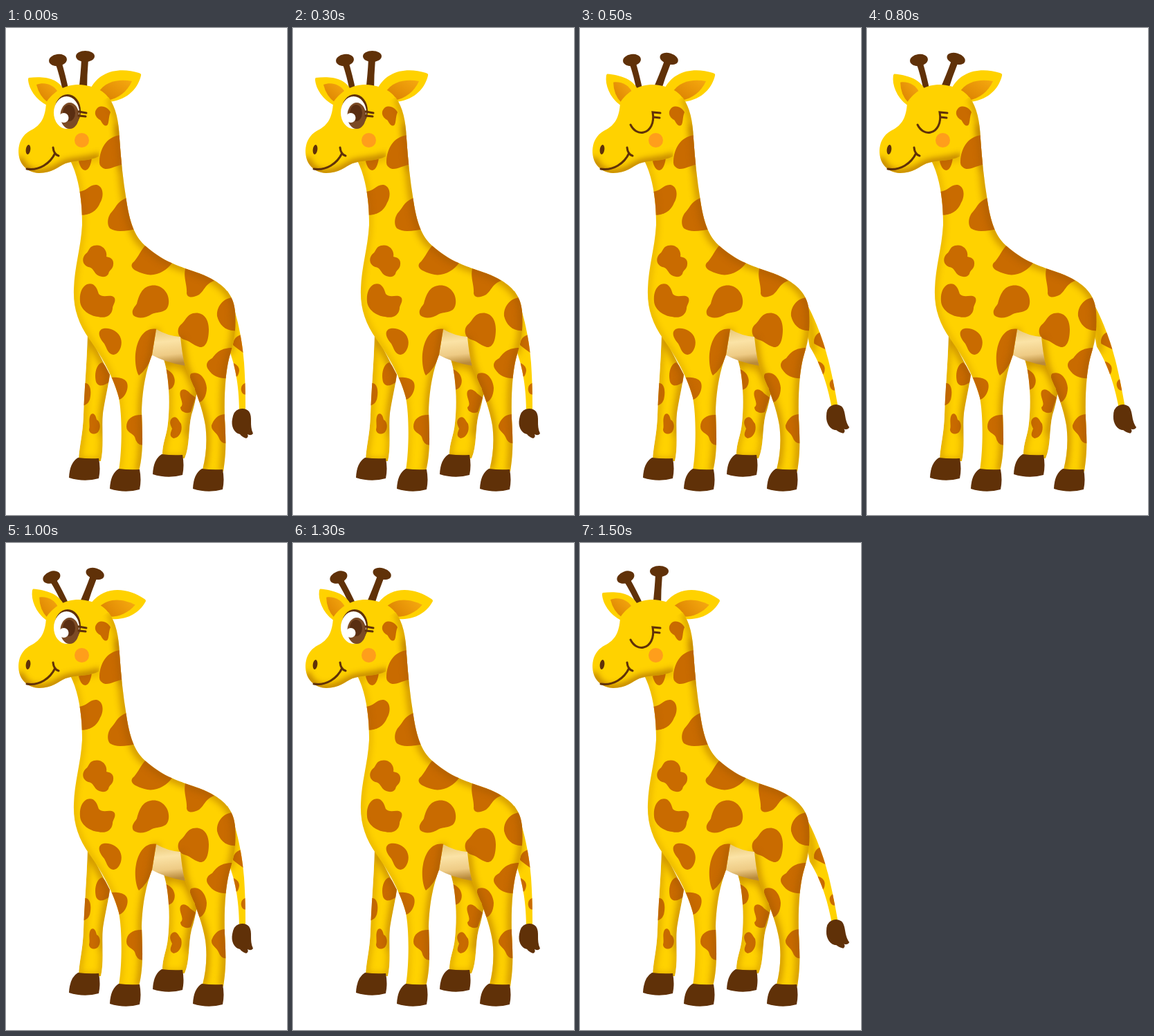
Animation, 406 px wide and 705 px high, one loop 2000 ms. Source, as an HTML page:

```html
<!DOCTYPE html>
<html lang="en">
<head>
<meta charset="utf-8">
<title>Giraffe</title>
<style>
  html, body { margin: 0; width: 100%; height: 100%; overflow: hidden; background: #fff; }
  svg { display: block; }
  .skin { fill: #ffd200; }
  .spot { fill: #c96b00; }
  .dark { fill: #603108; }
  .line { fill: none; stroke: #603108; stroke-width: 3; stroke-linecap: round; }
  .shade { fill: none; stroke: #9c5600; filter: url(#soft); }
</style>
</head>
<body>
<svg width="406" height="705" viewBox="0 0 406 705">
  <defs>
    <filter id="soft" filterUnits="userSpaceOnUse" x="0" y="0" width="406" height="705">
      <feGaussianBlur stdDeviation="5"/>
    </filter>
    <linearGradient id="cream" x2="0.1" y2="1">
      <stop stop-color="#e6c36c"/><stop offset=".4" stop-color="#fbe3a6"/>
      <stop offset=".75" stop-color="#eecb85"/><stop offset="1" stop-color="#b98a3a"/>
    </linearGradient>
    <linearGradient id="inner" x1="0" y1="1" x2="1" y2="0">
      <stop stop-color="#d87d00"/><stop offset="1" stop-color="#f6a90f"/>
    </linearGradient>

    <path id="body" d="M148 100C159 115 163 135 164 160C166 190 169 220 174 250C179 284 187 303 202 316C214 326 225 334 239 340C255 348 286 355 302 366C319 377 329 389 331 410C333 440 329 455 324 472C317 495 315 530 316 565C318 600 318 615 314 642L284 639C289 620 291 598 288 575C284 550 272 520 263 500C256 485 254 465 252 447Q234 446 217 436L211 473C203 494 197 520 196 555C197 590 199 612 192 642L163 640C168 610 168 560 163 535C155 505 138 475 121 451C104 427 97 405 98 378C99 345 108 320 110 285C110 255 107 220 93 192L100 130Z"/>
    <path id="head" d="M58 108C68 92 85 82 105 82C128 83 145 92 151 106L145 160Q136 165 134 186C122 193 100 191 86 196C75 201 66 210 48 210C38 210 29 205 24 198C18 190 17 178 19 170C21 160 28 152 36 148C50 141 57 130 58 108Z"/>
    <path id="foreleg" d="M118 440C117 485 113 525 112 560C111 590 106 604 105 626L137 627C142 605 138 580 140 558C143 538 147 522 150 502Z"/>
    <path id="hindleg" d="M228 480C236 505 237 545 234 572C232 592 225 602 226 622L258 623C266 605 263 580 268 560Q273 545 277 520L258 484Z"/>
    <path id="tailshape" d="M320 380C334 412 342 455 344 485C346 515 346 535 346 560L337 560C337 520 332 490 321 462Z"/>
    <path id="hoof" class="dark" d="M163 638Q178 640 193 639Q196 654 193 668Q172 674 150 667Q151 645 163 638Z"/>

    <clipPath id="inBody"><use href="#body"/></clipPath>
    <clipPath id="inHead"><use href="#head"/></clipPath>
    <clipPath id="inForeleg"><use href="#foreleg"/></clipPath>
    <clipPath id="inHindleg"><use href="#hindleg"/></clipPath>
    <clipPath id="inTail"><use href="#tailshape"/></clipPath>
  </defs>

  <g id="tail">
    <use href="#tailshape" class="skin"/>
    <g clip-path="url(#inTail)">
      <path class="spot" d="M345 443C332 444 328 452 328 459Q334 464 344 471ZM329 485Q337 489 337 496Q336 503 333 505L324 495ZM348 513Q338 516 340 525Q341 531 348 531Z"/>
      <path class="shade" stroke-width="9" opacity=".4" d="M323 400Q331 440 323 472"/>
    </g>
    <path class="dark" d="M336 552Q345 549 351 555C357 563 351 575 357 587Q354 591 349 588Q351 592 347 594Q341 592 338 588C329 586 325 576 327 566Q329 554 336 552Z"/>
  </g>

  <g clip-path="url(#inForeleg)">
    <use href="#foreleg" class="skin"/>
    <path class="spot" d="M139 484C131 486 127 500 130 512C134 522 144 516 150 512V496ZM114 514C122 514 124 526 121 538Q118 546 110 547ZM123 559C128 556 130 563 131 567C137 570 137 580 133 585C127 590 120 587 120 581C122 575 118 565 123 559Z"/>
    <use href="#foreleg" class="shade" stroke-width="7" opacity=".4"/>
    <path class="shade" stroke-width="12" opacity=".25" d="M121 451L150 502Q140 540 140 590"/>
  </g>
  <g clip-path="url(#inHindleg)">
    <use href="#hindleg" class="skin"/>
    <path class="spot" d="M231 494C240 497 246 506 243 516Q240 524 232 524ZM252 526C256 520 263 525 266 529L274 535L267 556C261 559 252 556 252 549C259 544 249 534 252 526ZM241 564C247 561 249 568 253 573C256 585 249 594 242 594C235 591 238 586 240 580C237 574 235 568 241 564Z"/>
    <use href="#hindleg" class="shade" stroke-width="7" opacity=".4"/>
    <path class="shade" stroke-width="14" opacity=".3" d="M228 482L262 492L275 525Q266 560 263 590"/>
  </g>
  <use href="#hoof" x="-59" y="-16"/>
  <use href="#hoof" x="62" y="-21"/>

  <path fill="url(#cream)" d="M217 434L254 444L260 489Q232 485 210 473Z"/>

  <g id="leftHorn">
    <path class="dark" d="M71 50L80 48Q86 68 91 92H82Q78 70 71 50Z"/>
    <ellipse class="dark" cx="75" cy="46.500" rx="13" ry="8.500" transform="rotate(-8 75 46.500)"/>
  </g>
  <g id="rightHorn">
    <path class="dark" d="M109 45H119Q117 68 117 92H105Q108 66 109 45Z"/>
    <ellipse class="dark" cx="114.500" cy="41" rx="13.500" ry="8"/>
  </g>
  <g id="leftEar">
    <path class="skin" d="M33 72C50 70 74 70 84 90L60 112C43 104 33 88 32 75Q32 72 33 72Z"/>
    <path fill="url(#inner)" d="M44 82C55 78 67 81 74 91L61 108Q48 99 44 82Z"/>
  </g>
  <g id="rightEar">
    <path class="skin" d="M120 92C134 60 166 57 192 65Q196 66 195 69C190 90 172 106 146 107Z"/>
    <path fill="url(#inner)" d="M133 94C144 76 164 74 182 77C175 92 163 102 146 105Z"/>
  </g>

  <use href="#body" class="skin"/>
  <g clip-path="url(#inBody)">
    <path class="spot" d="M104 188H124Q122 204 115 206Q107 206 104 188Z
      M105 237C118 236 120 226 131 227C142 230 141 245 136 253C130 268 118 271 106 271Z
      M174 246C160 252 160 258 153 266C147 272 145 284 150 290C160 297 175 293 190 291Z
      M127 315C138 312 147 321 145 331C150 332 156 334 155 342C155 349 149 350 148 356C145 362 135 361 130 356C126 351 125 347 119 346C110 343 109 333 115 327C120 324 119 317 127 315Z
      M201 315L240 340C232 352 215 361 200 356C186 352 178 347 183 340C190 334 192 326 201 315Z
      M117 371C127 368 131 375 134 385C140 392 152 384 157 391C159 397 154 401 154 406C153 416 144 421 133 418C121 417 108 408 107 396C106 385 109 375 117 371Z
      M209 373C224 370 237 383 235 399C233 413 222 410 211 414C200 421 190 421 184 416C180 409 186 404 189 399C192 388 196 375 209 373Z
      M259 348C272 352 290 355 301 366C288 370 287 380 279 386C270 391 262 391 261 384C262 372 256 362 259 348Z
      M270 413C284 410 293 420 293 436C293 452 289 463 280 462C268 458 266 453 257 451C248 448 246 436 252 430C259 425 260 416 270 413Z
      M327 390C312 392 304 405 305 417C308 430 318 440 334 438V395Z
      M138 436C147 432 163 438 166 450C169 460 163 473 155 473C147 472 146 464 142 457C136 450 131 441 138 436Z
      M218 436C202 433 192 446 188 465C185 480 188 498 192 503Q204 494 212 474Z
      M328 463C310 463 304 470 298 478C290 482 288 488 292 494C299 505 310 508 322 507Z
      M151 506C160 505 172 506 175 514C178 524 170 538 162 538Z
      M198 560C184 559 174 565 174 577C174 586 183 586 186 592Q189 605 199 604Z
      M319 559C306 558 300 567 297 575C296 583 304 585 307 592Q311 603 320 601Z
      M268 500C280 496 289 508 290 521C290 533 284 542 278 542C272 535 272 528 273 522C268 514 263 503 268 500Z"/>
    <path class="shade" stroke-width="12" opacity=".45" d="M163 140C167 200 171 240 175 255C179 290 189 307 202 316Q221 333 239 340C255 348 286 355 302 366C319 377 329 389 331 410C333 440 329 455 324 472C317 495 315 530 316 565Q319 610 314 642"/>
    <path class="shade" stroke-width="10" opacity=".5" d="M217 436L211 473C203 494 197 520 196 555Q199 612 192 642M252 447C254 465 256 485 263 500C272 520 284 550 288 575Q291 610 284 639"/>
    <path class="shade" stroke-width="6" opacity=".3" d="M93 192C107 220 110 255 110 285C108 320 99 345 98 378C97 405 104 427 121 451C138 475 155 505 163 535Q168 590 163 640"/>
    <path class="shade" stroke-width="6" opacity=".35" d="M92 195Q116 190 137 187"/>
  </g>
  <use href="#hoof"/>
  <use href="#hoof" x="120"/>

  <use href="#head" class="skin"/>
  <path class="shade" clip-path="url(#inHead)" stroke-width="9" opacity=".75" d="M19 188Q27 210 48 210C66 210 75 201 86 196C100 191 122 193 136 185"/>
  <g clip-path="url(#inBody)">
    <path class="spot" d="M133 115C140 111 148 116 151 122C148 128 149 139 146 141C141 143 139 137 136 133C130 130 125 122 133 115ZM135 192C136 176 144 157 166 155L171 197C158 199 146 208 139 202Q134 199 135 192Z"/>
    <path class="shade" stroke-width="10" opacity=".4" d="M150 102C164 125 164 160 169 205"/>
  </g>
  <circle cx="109.500" cy="162.500" r="10.500" fill="#ff9e1b"/>
  <ellipse class="dark" cx="32" cy="176" rx="3.300" ry="7" transform="rotate(8 32 176)"/>
  <path class="line" d="M30 204C48 207 64 196 71 181M68 173Q69 183 76 185"/>

  <g id="openEye">
    <ellipse class="dark" cx="89" cy="120" rx="19" ry="24"/>
    <ellipse cx="87.500" cy="122.500" rx="18.500" ry="23.500" fill="#fff"/>
    <ellipse cx="92" cy="127" rx="13.500" ry="19" fill="#7b4a25"/>
    <ellipse cx="91" cy="123" rx="9" ry="12" fill="#5a2e12"/>
    <circle cx="83.500" cy="130" r="7" fill="#fff"/>
    <path class="line" stroke-width="2" d="M105 121L116 123M105 127L115 128"/>
  </g>
  <path id="closedEye" class="line" d="M73 140C77 148 84 153 92 151C101 149 108 138 105 122L116 123M106 129L115 130"/>
</svg>
<script>
  const part = id => document.getElementById(id);
  // Each part switches between rest and a turned pose, one entry per 500 ms.
  const joints = [
    { id: 'leftHorn', turn: '-13 84 88', poses: [0, 0, 1, 1] },
    { id: 'rightHorn', turn: '17 110 90', poses: [0, 1, 1, 0] },
    { id: 'leftEar', turn: '12 62 100', poses: [0, 1, 1, 0] },
    { id: 'rightEar', turn: '16 140 100', poses: [0, 0, 1, 1] },
    { id: 'tail', turn: '-10 322 399', poses: [0, 1, 0, 1] }
  ];

  function draw() {
    const step = Math.floor(performance.now() / 500) % 4;
    for (const { id, turn, poses } of joints) {
      part(id).setAttribute('transform', poses[step] ? `rotate(${turn})` : '');
    }
    const blink = step % 2 === 1;
    part('openEye').style.display = blink ? 'none' : '';
    part('closedEye').style.display = blink ? '' : 'none';
    requestAnimationFrame(draw);
  }
  draw();
</script>
</body>
</html>
```
